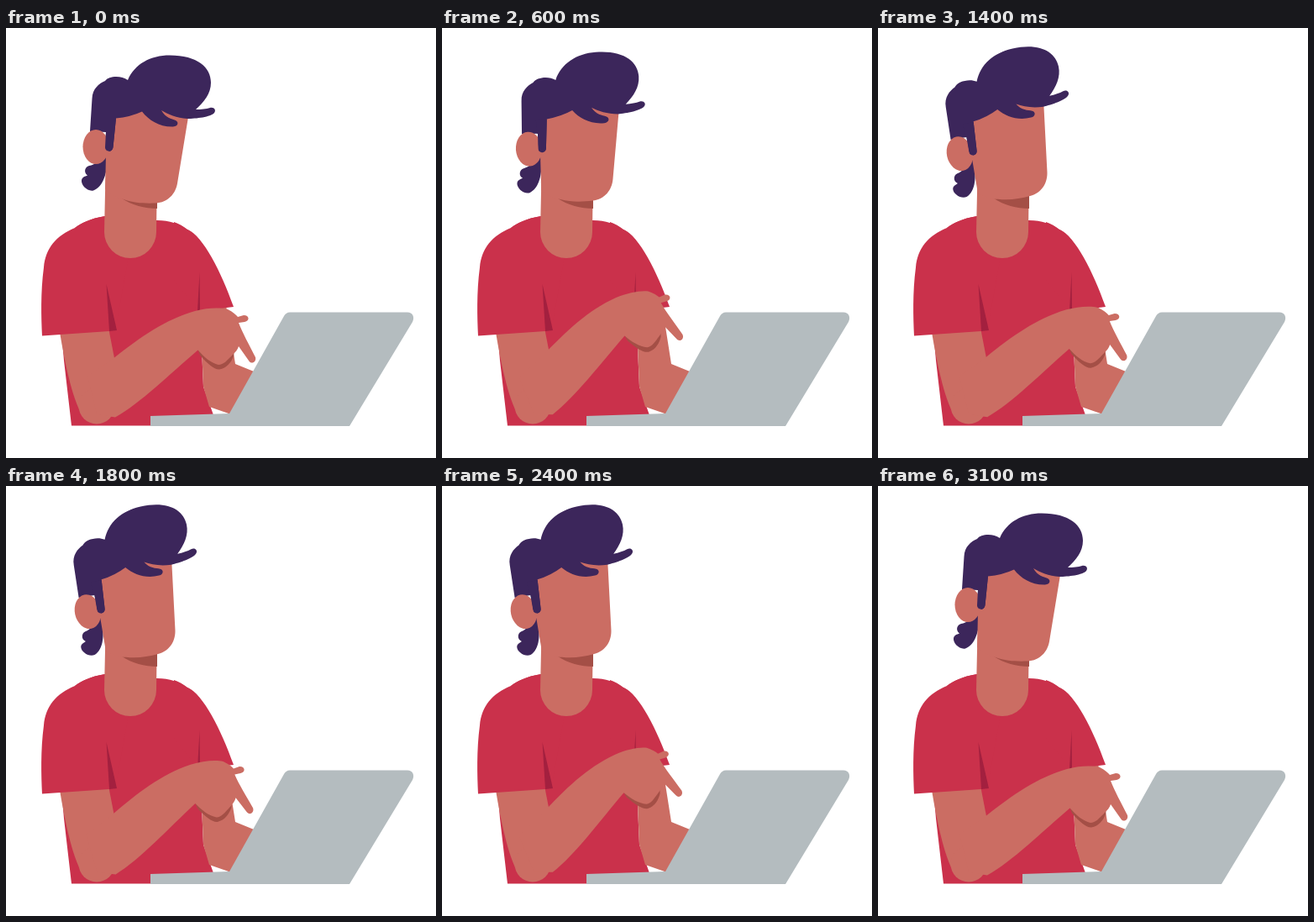
Animation, 512 px wide and 512 px high, one loop 3.2 s. Source, as an HTML page with a canvas:

```html
<!DOCTYPE html>
<html lang="en">
<head>
<meta charset="utf-8">
<title>Typing at a laptop</title>
<style>
  html, body { margin: 0; width: 100%; height: 100%; overflow: hidden; background: #fff; }
  canvas { display: block; width: 512px; height: 512px; }
</style>
</head>
<body>
<canvas id="stage"></canvas>
<script>
const SIZE = 512, LOOP = 3200, STEP = 100;
const canvas = document.getElementById('stage');
const ctx = canvas.getContext('2d');
const ratio = window.devicePixelRatio || 1;
canvas.width = canvas.height = SIZE * ratio;

const SKIN = '#cb6d63', SHADE = '#a44f46', SHIRT = '#ca314b',
      FOLD = '#a3203f', HAIR = '#3c265b', METAL = '#b4bcbf';

const shape = {
  torso: new Path2D('M118 224C100 227 90 232 82 238L66 360L69 396L78 473.5H251L246 458L235 427L231 335L250 290C236 255 225 244 216 240C206 233 195 229 180 229Z'),
  backArm: new Path2D('M231 330H262L273 400L300 411L268 460L242 451L235 427Z'),
  backSleeve: new Path2D('M200 231C206 233 211 236 216 240C235 248 256 290 271 332L229 337L200 300Z'),
  backFold: new Path2D('M230.5 291L231 335.5L228 337Z'),
  upperArm: new Path2D('M64 362C70 398 77 432 87 454L108 450L131 435L129 393L122 357Z'),
  frontSleeve: new Path2D('M118 224C100 227 90 232 82 238C60 247 47 262 45 285C41 315 42 345 43 366.5L130 360.5L150 250Z'),
  frontFold: new Path2D('M119.5 305L132 360L123 361Z'),
  neck: new Path2D('M119 150L117 243A31 31 0 0 0 179 243L180 160Z'),
  neckShade: new Path2D('M138 203C150 211 165 215 180 215V190H138Z'),
  laptop: new Path2D('M338 338.5H478C484 338.5 487 344 484 350L409 474H172V462L266 459L331 343Q333.500 338.500 338 338.500Z'),
  tail: new Path2D('M121 152C121 172 116 189 104 193.500C97 195 89 187 90 181C91 177 94 177 97 175.500C92 172 94 165 99 164C106 163 112 158 114 150Z'),
  face: new Path2D('M131 95L120 150L118 192Q128 202 140 204C152 208.500 166 209 178 208.500C193 208 202 197 204 185L217 106L195 85Z'),
  hair: new Path2D('M100 123L102.500 84C103 72 111 66 118 63C122 57 137 56 145 62C153 43 172 32.500 195 32.500C228 32.500 244 47 244 65C244 78 236 88 226 97Q236 97 243 95C248 94 250.500 98 248 101C244 106 226 108 216 108C203 107 193 103 185 98C190 107 197 108 202 110C206 112 205 117 199 117.500C183 118 170 110 162 99.500Q148 106 131 107.500L127.500 142C127 148.500 118 148 118 142L119 124Z'),
  handShade: new Path2D('M228 382L231 389.500C240 400 248 407 254 406.500C263 405 268 398 271 391L272 382Z'),
  forearm: new Path2D('M97 414L129 392.500C160 368 190 347 225 337C240 333 255 332.500 264 335C270 338 274 341.500 276 344L283 342C290 342 290.500 349 284 350L277 351C281 362 290 378 297 392C298.500 398 292 401 289 396L277 379C276 383 273 386 270 389C263 396 259 401 253 401C244 399 236 392 228.500 383.500C195 412 160 447 130 463.500L108 460Z')
};

const rad = deg => deg * Math.PI / 180;
const clamp = x => Math.min(1, Math.max(0, x));
const ease = x => x * x * (3 - 2 * x);
const ramp = (t, from, to) => ease(clamp((t - from) / (to - from)));

// Turning points of the tapping arm: [time, height], 1 is lowest.
const taps = [[-50, 1], [750, -1], [1510, .93], [2350, -1], [3150, 1], [3950, -1]];

function tapAt(t) {
  const i = taps.findIndex(k => k[0] > t);
  const [t0, a] = taps[i - 1], [t1, b] = taps[i];
  const p = (1 - Math.cos(Math.PI * (t - t0) / (t1 - t0))) / 2;
  return a + (b - a) * p;
}

function fill(path, color) {
  ctx.fillStyle = color;
  ctx.fill(path);
}

function oval(x, y, rx, ry, color) {
  ctx.fillStyle = color;
  ctx.beginPath();
  ctx.ellipse(x, y, rx, ry, 0, 0, Math.PI * 2);
  ctx.fill();
}

function turned(x, y, deg, paint) {
  ctx.save();
  ctx.translate(x, y);
  ctx.rotate(rad(deg));
  ctx.translate(-x, -y);
  paint();
  ctx.restore();
}

function draw(t) {
  const headTurn = -12.3 * (ramp(t, 400, 900) - ramp(t, 2450, 2950));
  const armTurn = 4.64 * (tapAt(t) - .98);

  ctx.setTransform(ratio, 0, 0, ratio, 0, 0);
  ctx.fillStyle = '#fff';
  ctx.fillRect(0, 0, SIZE, SIZE);

  fill(shape.torso, SHIRT);
  fill(shape.backArm, SKIN);
  fill(shape.backSleeve, SHIRT);
  fill(shape.backFold, FOLD);

  turned(140, 190, headTurn, () => fill(shape.tail, HAIR));
  fill(shape.upperArm, SKIN);
  fill(shape.frontSleeve, SHIRT);
  fill(shape.frontFold, FOLD);
  fill(shape.neck, SKIN);
  fill(shape.neckShade, SHADE);
  // Keep the shade on the neck only.
  turned(140, 190, headTurn, () => {
    fill(shape.face, SKIN);
    fill(shape.hair, HAIR);
    oval(107, 141.5, 15.5, 20.5, SKIN);
    ctx.save();
    ctx.beginPath();
    ctx.rect(118, 108, 14, 42);
    ctx.clip();
    fill(shape.hair, HAIR);
    ctx.restore();
  });

  oval(108, 450, 21.5, 21.5, SKIN);
  turned(108, 450, armTurn, () => {
    fill(shape.handShade, SHADE);
    fill(shape.forearm, SKIN);
  });
  fill(shape.laptop, METAL);
}

function tick() {
  const t = performance.now() % LOOP;
  draw(Math.floor(t / STEP) * STEP);
  requestAnimationFrame(tick);
}
tick();
</script>
</body>
</html>
```
